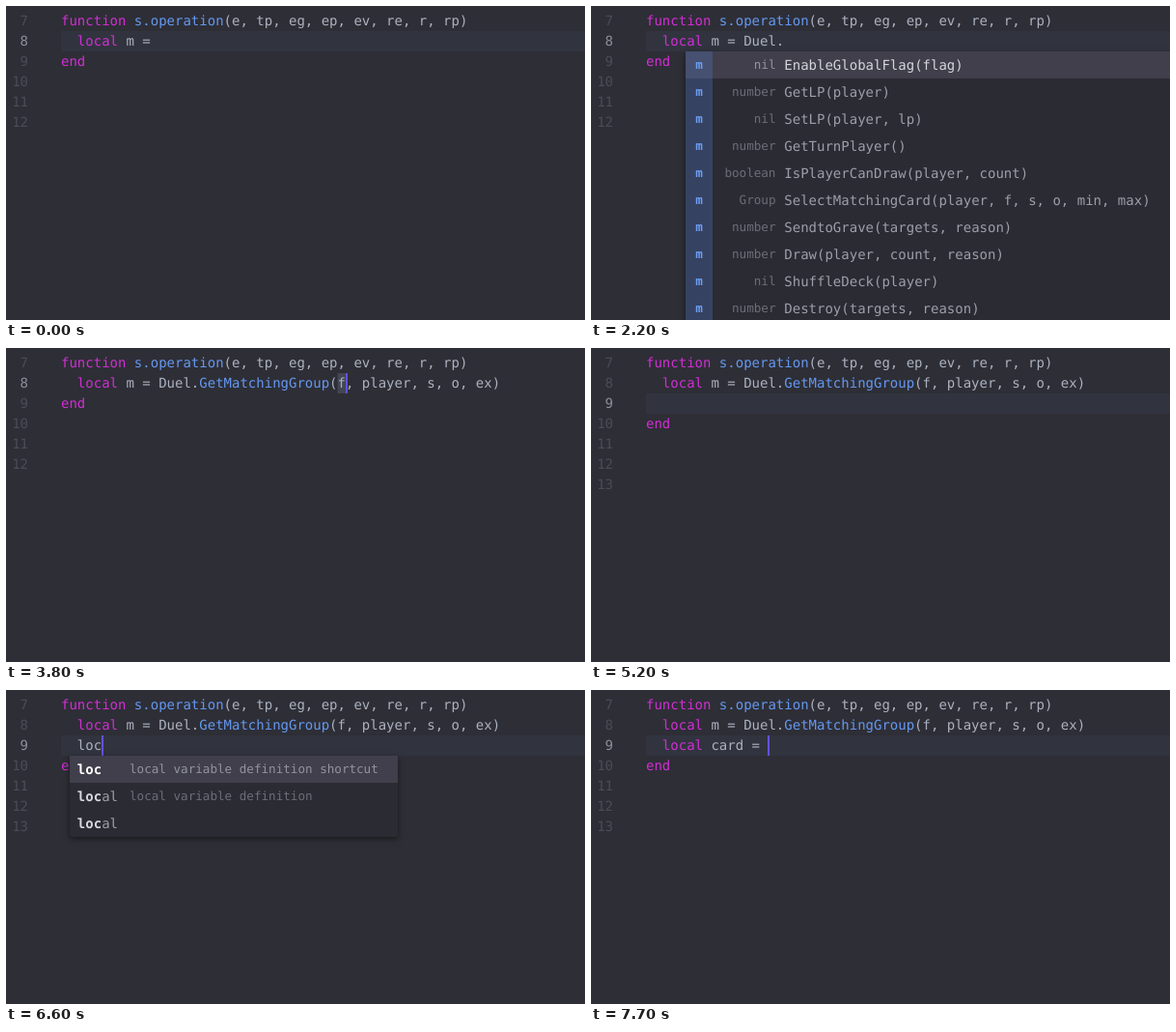
Animation of 600 by 325 pixels, one loop 8 s. Source, as an HTML page with a canvas:

```html
<!DOCTYPE html>
<html lang="en">
<head>
<meta charset="utf-8">
<title>Editor autocompletion</title>
<style>
  html, body { margin: 0; height: 100%; overflow: hidden; background: #2e2e36; }
  canvas { display: block; }
</style>
</head>
<body>
<canvas id="stage" width="600" height="325"></canvas>
<script>
const ctx = document.getElementById('stage').getContext('2d', { alpha: false });
ctx.textRendering = 'geometricPrecision';

const LOOP = 8000;
const LEFT = 57, LINE = 21, TOP = 5, ROW = 28;
const CHAR = 14 * 0.602, SMALL_CHAR = 12.6 * 0.602;
const MONO = '"DejaVu Sans Mono", monospace';
const CODE = `14px ${MONO}`, BOLD = `bold 14px ${MONO}`, SMALL = `12.6px ${MONO}`;
const PROSE = '12.6px "Noto Sans", sans-serif';

const COLORS = {
  keyword: '#d02fd3', call: '#6498f0', property: '#e05a66', plain: '#abb2bf',
  number: '#4c4c58', activeNumber: '#8c8e99', activeLine: '#31343f',
  cursor: '#6450f8', selection: '#434653'
};

// letter: [letter colour, cell colour, selected cell colour]
const ICONS = {
  c: ['#d8bd82', '#514c45', '#605b52'],
  m: ['#6c9ff5', '#364262', '#465070'],
  v: ['#abafb9', '#43434d', '#52525d']
};

const HEADER = 'function s.operation(e, tp, eg, ep, ev, re, r, rp)';
const CALL = 'local m = Duel.GetMatchingGroup(f, player, s, o, ex)';

// Rows: [icon, label, name, note]
const shortcuts = { rows: [
  ['', '', 'def', 'function definition'],
  ['', '', 'defn', 'local function definition']
] };
const duel = {
  rows: [['c', '', 'Duel']],
  info: ['Contains all functions to operate on', 'cards and effects in a Duel']
};
const methods = { rows: [
  ['m', 'nil', 'EnableGlobalFlag(flag)'],
  ['m', 'number', 'GetLP(player)'],
  ['m', 'nil', 'SetLP(player, lp)'],
  ['m', 'number', 'GetTurnPlayer()'],
  ['m', 'boolean', 'IsPlayerCanDraw(player, count)'],
  ['m', 'Group', 'SelectMatchingCard(player, f, s, o, min, max)'],
  ['m', 'number', 'SendtoGrave(targets, reason)'],
  ['m', 'number', 'Draw(player, count, reason)'],
  ['m', 'nil', 'ShuffleDeck(player)'],
  ['m', 'number', 'Destroy(targets, reason)']
] };
const getters = { rows: [
  ['m', 'number', 'GetLP(player)'],
  ['m', 'number', 'GetTurnCount()'],
  ['m', 'number', 'GetTurnPlayer()'],
  ['m', 'number', 'GetDrawCount(player)'],
  ['m', 'number', 'GetFlagEffect(player, code)'],
  ['m', 'boolean', 'GetControl(target, player)'],
  ['m', 'Group', 'GetFieldGroup(player, s, o)'],
  ['m', 'Card', 'GetFieldCard(player, location, seq)'],
  ['m', 'number', 'GetLocationCount(player, location, use)'],
  ['m', 'Group', 'GetOperatedGroup()']
] };
const matching = word => ({
  rows: [
    ['m', 'Group', 'GetMatchingGroup(f, player, s, o, ex)'],
    ['m', 'number', 'GetMatchingGroupCount(f, player, s, o, ex)'],
    ['v', '', word]
  ],
  info: [
    'GetMatchingGroup(f: function, player: number, s: number, o: number, ex:',
    'Card | nil, ...): Group',
    'Filter function to return to the specified location to meet the filter condition',
    'f and not equal to the ex card.',
    'The sixth parameter starts as an extra parameter.'
  ]
});
const locations = { rows: [
  ['DECK', 'the main deck'], ['HAND', 'the hand'], ['MZONE', 'the monster zone'],
  ['SZONE', 'the spell and trap zone'], ['GRAVE', 'the graveyard'],
  ['REMOVED', 'the banished cards'], ['EXTRA', 'the extra deck'],
  ['ONFIELD', 'the sum of every location on the field']
].map(([name, note]) => ['v', '', 'LOCATION_' + name, note]) };
const locals = { rows: [
  ['', '', 'loc', 'local variable definition shortcut'],
  ['', '', 'local', 'local variable definition'],
  ['', '', 'local']
] };
const localOnly = { rows: locals.rows.slice(1) };
const card = { rows: [['c', '', 'Card']], info: ['Contains all functions of a Card'] };

// [time, edited text, popup, [cursor column, selection length]]
const steps = [
  [-300, 'local m = '],
  [800, 'local m =  '],
  [1200, 'local m = '],
  [1400, 'local m = D', shortcuts],
  [1500, 'local m = Du', duel],
  [1700, 'local m = Due', duel],
  [1800, 'local m = Duel', duel],
  [1900, 'local m = Duel.'],
  [2000, 'local m = Duel.', methods],
  [2600, 'local m = Duel.g', getters],
  [2800, 'local m = Duel.get', getters],
  [3000, 'local m = Duel.getm', matching('getm')],
  [3100, 'local m = Duel.getma', matching('getma')],
  [3800, CALL, null, [35, 1]],
  [4700, CALL, null, [43, 6]],
  [4800, CALL],
  [4900, ''],
  [5600, 'd', shortcuts],
  [6100, '']
];
const typed = 'local card = ';
const typedPopups = [locations, locals, locals, localOnly, localOnly, null, card, card, card, card];
for (let i = 0; i < typed.length; i++) {
  const time = i < 12 ? 6400 + i * 100 : 7700;
  steps.push([time, typed.slice(0, i + 1), typedPopups[i]]);
}

const colX = col => LEFT + col * CHAR;

function rect(x, y, w, h, color) {
  ctx.fillStyle = color;
  ctx.fillRect(x, y, w, h);
}

function text(str, x, y, color, font = CODE, align = 'left') {
  ctx.font = font;
  ctx.textAlign = align;
  ctx.fillStyle = color;
  ctx.fillText(str, x, y);
}

function codeLine(str, row) {
  const tokens = /\b(function|local|end)\b|(s\.operation|GetMatchingGroup(?=\())|((?<=Duel\.)\w+)|[^\s\w]+|\w+/g;
  for (const m of str.matchAll(tokens)) {
    const kind = m[1] ? 'keyword' : m[2] ? 'call' : m[3] ? 'property' : 'plain';
    text(m[0], colX(m.index), TOP + row * LINE + 15, COLORS[kind]);
  }
}

function popupBox(anchor, top, prefix, { rows, info = [] }) {
  const longest = i => Math.max(...rows.map(r => (r[i] || '').length));
  const labelWidth = longest(1) * SMALL_CHAR;
  const margin = !rows[0][0] ? 8 : labelWidth ? 48.8 + labelWidth : 38;
  const left = Math.round(anchor - margin);
  const noteX = anchor + longest(2) * CHAR + 12;
  const end = longest(3) ? noteX + longest(3) * SMALL_CHAR : noteX - 12;
  const width = Math.round(Math.max(end + 20 - left, info.length ? 243 : 0));
  const listHeight = rows.length * ROW;
  const height = listHeight + (info.length && info.length * 16 + 11);

  ctx.save();
  ctx.beginPath();
  ctx.roundRect(left, top, width, height, [0, 0, 3, 3]);
  ctx.shadowColor = 'rgba(0,0,0,.5)';
  ctx.shadowBlur = 6;
  ctx.shadowOffsetY = 2;
  ctx.fillStyle = '#222327';
  ctx.fill();
  ctx.shadowColor = 'transparent';
  ctx.clip();
  rect(left, top, width, listHeight, '#2b2b33');

  rows.forEach(([icon, label, name, note], i) => {
    const y = top + i * ROW, selected = i === 0;
    if (selected) rect(left, y, width, ROW, '#403f4b');
    if (icon) {
      const [ink, cell, selectedCell] = ICONS[icon];
      rect(left, y, ROW, ROW, selected ? selectedCell : cell);
      text(icon, left + 14, y + 18, ink, `bold 12.6px ${MONO}`, 'center');
    }
    const dim = selected ? '#92939d' : '#6d6d78';
    if (label) text(label, anchor - 8.8 - label.length * SMALL_CHAR, y + 18, dim, SMALL);
    const hit = name.toLowerCase().startsWith(prefix.toLowerCase()) ? prefix.length : 0;
    text(name.slice(0, hit), anchor, y + 19, selected ? '#ffffff' : '#d7d8de', BOLD);
    text(name.slice(hit), anchor + hit * CHAR, y + 19, selected ? '#d3d5db' : '#9c9ea8');
    if (note) text(note, noteX, y + 18, dim, SMALL);
  });
  info.forEach((line, i) => text(line, left + 8, top + listHeight + 18 + i * 16, '#a3a5b0', PROSE));
  ctx.restore();
}

function draw(t) {
  const index = steps.findLastIndex(s => s[0] <= t);
  const [, str, popup, range] = steps[index];
  const added = t >= 4900;
  const active = added ? 2 : 1;
  const edited = '  ' + str;
  const [col, selected] = range || [edited.length, 0];
  const y = TOP + active * LINE;

  rect(0, 0, 600, 325, '#2e2e36');
  if (selected) rect(colX(col - selected), y, selected * CHAR, LINE, COLORS.selection);
  else rect(LEFT, y, 600 - LEFT, LINE, COLORS.activeLine);

  for (let row = 0; row < (added ? 7 : 6); row++) {
    const color = row === active ? COLORS.activeNumber : COLORS.number;
    text(row + 7, 23, TOP + row * LINE + 15, color, CODE, 'right');
  }
  const lines = added ? [HEADER, '  ' + CALL, edited, 'end'] : [HEADER, edited, 'end'];
  lines.forEach(codeLine);

  // The blink restarts with each key; a popup alone does not restart it.
  const lastKey = index && !range && steps[index - 1][1] === str && !steps[index - 1][3]
    ? steps[index - 1][0] : steps[index][0];
  if ((t - lastKey + 100) % 800 < 400) rect(Math.round(colX(col)), y, 2, LINE, COLORS.cursor);

  if (popup) {
    const prefix = edited.match(/\w*$/)[0];
    popupBox(colX(edited.length - prefix.length), y + LINE, prefix, popup);
  }
}

function frame() {
  draw(performance.now() % LOOP);
  requestAnimationFrame(frame);
}
frame();
</script>
</body>
</html>
```
